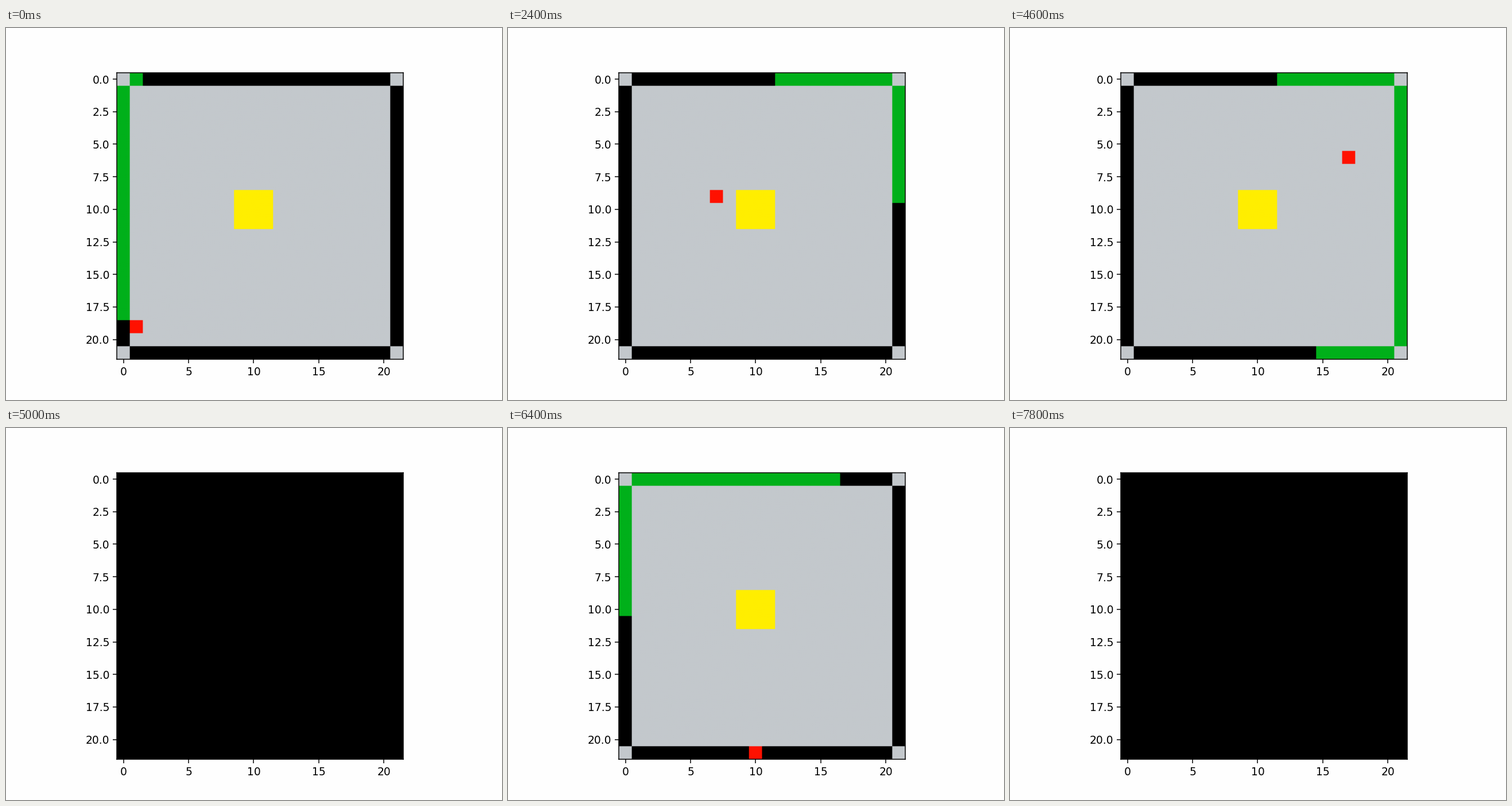
A matplotlib script that plays this animation: 864x648 px, repeating every 8000 ms.

```python
import matplotlib.pyplot as plt
import numpy as np
from matplotlib.animation import FuncAnimation
from matplotlib.colors import to_rgb

SIZE, LAST, CENTER = 22, 21, 10
FRAMES, INTERVAL = 40, 200
CELL_PX = 17
BLACK, FLOOR, SHIELD, CORE, BALL = range(5)
COLORS = np.array([to_rgb(c) for c in
                   ("#000000", "#c3c8cc", "#00b01a", "#ffee00", "#ff1100")])

# Wall cells (row, column), clockwise from the bottom of the left wall.
INNER = range(1, LAST)
RING = np.array([(r, 0) for r in INNER[::-1]] + [(0, c) for c in INNER]
                + [(r, LAST) for r in INNER] + [(LAST, c) for c in INNER[::-1]])

# Each round: launch frame, ball direction, shield's final position and length.
ROUNDS = [
    (-4, (-1, 1), -1, 19),
    (6, (-0.8, 0.6), -9, 9),
    (11, (-1, -1 / 3), 19, 18),
    (14, (-1, 1), -1, 35),
    (20, (1, -0.6), 25, 35),
    (27, (0, 1), 10, 26),
    (33, (-1, 0.6), -5, 26),
]
PAUSES, PAUSE_LENGTH = (9, 25, 39), 3
FLIGHT, REST = 5, 1  # frames to reach the wall, then frames held there
TURN = 3             # ring cells the shield turns per frame


def board(frame):
    grid = np.full((SIZE, SIZE), BLACK)
    if any(0 <= frame - p < PAUSE_LENGTH for p in PAUSES):
        return grid

    grid[1:-1, 1:-1] = FLOOR
    grid[::LAST, ::LAST] = FLOOR
    grid[CENTER - 1:CENTER + 2, CENTER - 1:CENTER + 2] = CORE

    launch, (dx, dy), stop, length = [r for r in ROUNDS if r[0] <= frame][-1]
    age = frame - launch
    start = stop + TURN * max(FLIGHT - age, 0)
    rows, cols = RING.take(range(start, start + length), axis=0, mode="wrap").T
    grid[rows, cols] = SHIELD

    if age <= FLIGHT + REST:
        reach = 1 + 2 * age
        x = np.clip(round(CENTER + reach * dx), 1, LAST - 1)
        y = np.clip(round(CENTER + reach * dy), 0, LAST)
        grid[y, x] = BALL
    return grid


def picture(frame):
    """Enlarge the board so that smoothing only softens the cell edges."""
    return COLORS[board(frame).repeat(CELL_PX, 0).repeat(CELL_PX, 1)]


fig, ax = plt.subplots(figsize=(6.4, 4.8), dpi=135, facecolor="#fefefe")
image = ax.imshow(picture(0), interpolation="bilinear",
                  extent=(-0.5, LAST + 0.5, LAST + 0.5, -0.5))


def update(frame):
    image.set_data(picture(frame))
    return [image]


anim = FuncAnimation(fig, update, frames=FRAMES, interval=INTERVAL, repeat=True,
                     repeat_delay=0)
plt.show()
```
